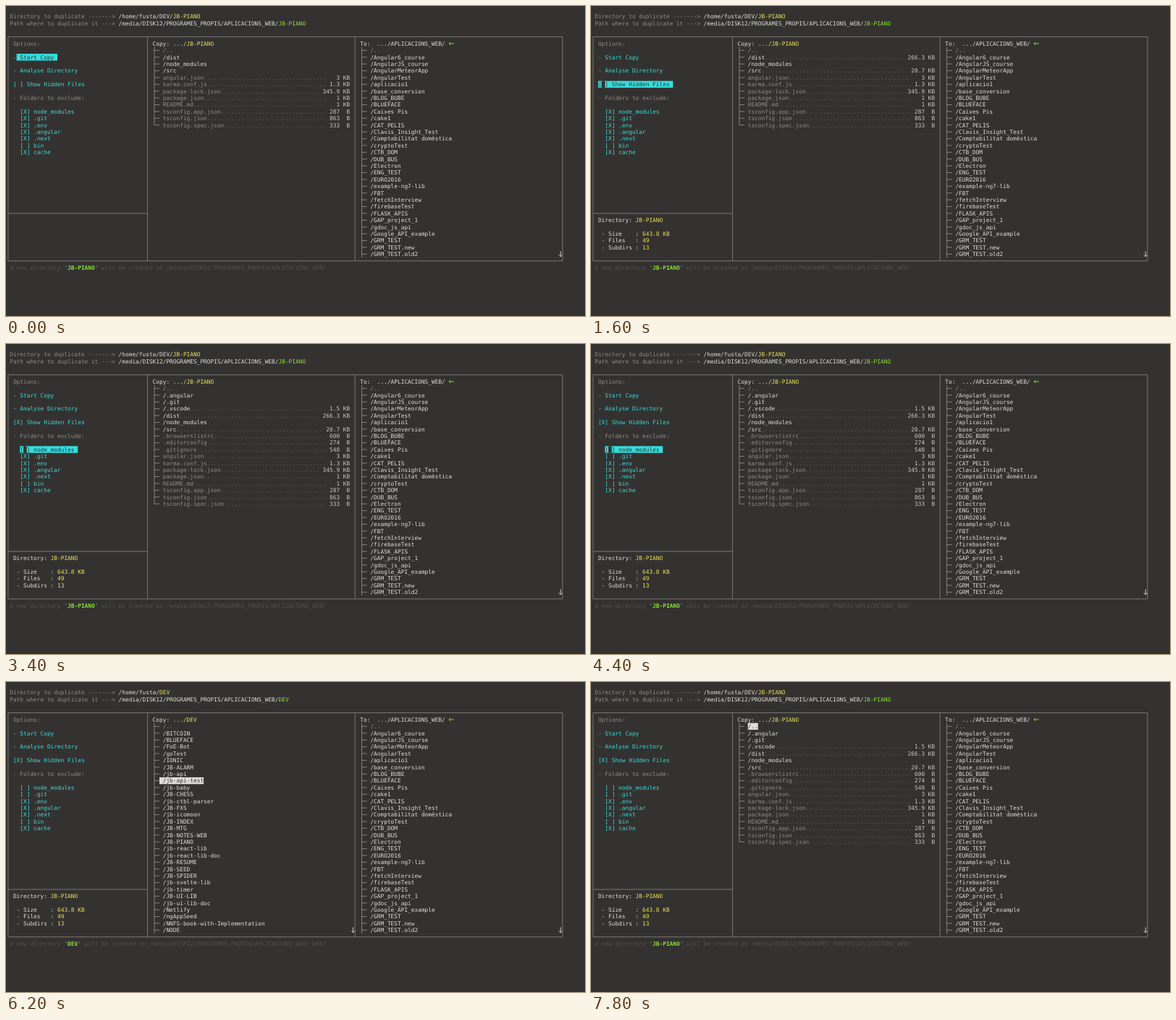
These frames come from a looping animation (800 px wide and 429 px high, 8 s). An HTML page with a canvas:

```html
<!DOCTYPE html>
<html lang="en">
<head>
<meta charset="utf-8">
<title>Directory copy tool</title>
<style>
  html, body { margin: 0; width: 100%; height: 100%; overflow: hidden; background: #343230; }
  canvas { display: block; }
</style>
</head>
<body>
<canvas id="stage" width="800" height="429"></canvas>
<script>
const ctx = document.getElementById('stage').getContext('2d');
const LOOP = 8000, STEP = 200;
const CELL_W = 4.7, CELL_H = 9.4;
const BG = '#343230', WHITE = '#e0deda', GRAY = '#8e8c88', FAINT = '#53514e', LINE = '#817f7b',
      CYAN = '#34dede', YELLOW = '#ece35a', LIME = '#8ae234', OLIVE = '#8b8a55';
const FONT = '7.8px "DejaVu Sans Mono", "Noto Sans Mono", monospace';

const TARGET = '/media/DISK12/PROGRAMES_PROPIS/APLICACIONS_WEB/';
const EXCLUDES = ['node_modules', '.git', '.env', '.angular', '.next', 'bin', 'cache'];
const TARGET_DIRS = `Angular6_course,AngularJS_course,AngularMeteorApp,AngularTest,aplicacio1,base_conversion,BLOG_BUBE,BLUEFACE,Caixes Pis,cake1,CAT_PELIS,Clavis_Insight_Test,Comptabilitat domèstica,cryptoTest,CTB_DOM,DUB_BUS,Electron,ENG_TEST,EURO2016,example-ng7-lib,FBT,fetchInterview,firebaseTest,FLASK_APIS,GAP_project_1,gdoc_js_api,Google_API_example,GRM_TEST,GRM_TEST.new,GRM_TEST.old2`.split(',');
const DEV_DIRS = `BITCOIN,BLUEFACE,FoE-Bot,goTest,IONIC,JB-ALARM,jb-api,jb-api-test,jb-baby,JB-CHESS,jb-ctbl-parser,JB-FXS,jb-icomoon,JB-INDEX,JB-MTG,JB-NOTES-WEB,JB-PIANO,jb-react-lib,jb-react-lib-doc,JB-RESUME,JB-SEED,JB-SPIDER,jb-svelte-lib,jb-timer,JB-UI-LIB,jb-ui-lib-doc,Netlify,ngAppSeed,NNFS-book-with-Implementation,NODE`.split(',');
const PROJECT = [
  ['/.angular'], ['/.git'], ['/.vscode', '1.5 KB'], ['/dist', '266.3 KB'], ['/node_modules'],
  ['/src', '20.7 KB'], ['.browserslistrc', '600  B'], ['.editorconfig', '274  B'],
  ['.gitignore', '548  B'], ['angular.json', '3 KB'], ['karma.conf.js', '1.3 KB'],
  ['package-lock.json', '345.9 KB'], ['package.json', '1 KB'], ['README.md', '1 KB'],
  ['tsconfig.app.json', '287  B'], ['tsconfig.json', '863  B'], ['tsconfig.spec.json', '333  B']
];
const asFolders = names => names.map(name => ['/' + name]);

const colX = col => 0.5 + col * CELL_W;
const rowY = row => 5 + row * CELL_H;
const midX = col => colX(col + 0.5);

function text(col, row, string, color) {
  ctx.fillStyle = color;
  [...string].forEach((char, i) => {
    if (char !== ' ') ctx.fillText(char, midX(col + i), rowY(row) + 2.8);
  });
}

function fillCells(col, row, count, color) {
  ctx.fillStyle = color;
  ctx.fillRect(colX(col), rowY(row) - CELL_H / 2, count * CELL_W, CELL_H);
}

function line(color, ...points) {
  ctx.strokeStyle = color;
  ctx.beginPath();
  points.forEach(([x, y]) => ctx.lineTo(x, y));
  ctx.stroke();
}

function downArrow(col) {
  const x = midX(col) + 2, y = rowY(36);
  line(WHITE, [x, y - 4], [x, y + 3.5]);
  line(WHITE, [x - 2.3, y + 1], [x, y + 3.5], [x + 2.3, y + 1]);
}

function frame() {
  const left = midX(0), right = midX(163), top = rowY(4), bottom = rowY(37);
  line(LINE, [left, top], [right, top], [right, bottom], [left, bottom], [left, top]);
  for (const col of [41, 102]) line(LINE, [midX(col), top], [midX(col), bottom]);
  line(LINE, [left, rowY(30)], [midX(41), rowY(30)]);
}

function tree(col, items, { showFolderSizes, pick = -1, pickOffset = 2, scrolls }) {
  [['/..'], ...items].forEach(([name, size], i, all) => {
    const row = 6 + i, y = rowY(row), x = midX(col);
    const isFolder = name[0] === '/', isLast = i === all.length - 1 && !scrolls;
    line(GRAY, [x, y - CELL_H / 2], [x, isLast ? y : y + CELL_H / 2]);
    line(GRAY, [x, y], [colX(col + 2), y]);

    if (i === pick) fillCells(col + pickOffset, row, name.length + 3 - pickOffset, WHITE);
    text(col + 3, row, name, i === pick ? BG : isFolder && i ? WHITE : GRAY);

    if (size && (!isFolder || showFolderSizes)) {
      const start = col + 3 + name.length, sizeCol = 101 - size.length;
      text(start, row, '.'.repeat(Math.min(94, sizeCol - 1) - start), '#65635f');
      text(sizeCol, row, size, '#cbc9c5');
    }
  });
}

function action(row, label, selected) {
  text(2, row, '-', CYAN);
  if (selected) fillCells(3, row, label.length + 2, CYAN);
  text(4, row, label, selected ? BG : CYAN);
}

function checkbox(col, row, label, checked, selected) {
  const color = selected ? BG : CYAN;
  if (selected) {
    fillCells(col, row, label.length + 5, CYAN);
    fillCells(col + 1, row, 1, BG);
  }
  text(col, row, '[ ] ' + label, color);
  if (checked) text(col + 1, row, 'X', CYAN);
}

// Value of the last [start, value] pair already reached
const latest = (t, pairs) => pairs.filter(([start]) => t >= start).pop()[1];

function stateAt(t) {
  const presses = Math.floor((t - 5400) / STEP);
  const picked = presses > 0 ? Math.min(17, 1 + Math.floor((presses - 1) * 2.6)) : 0;
  return {
    cursor: latest(t, [[0, 7], [600, 9], [1400, 11], [2600, 15], [3800, 16], [4200, 15], [4800, -1]]),
    analysed: t >= 1000,
    hidden: t >= 1800,
    unchecked: { node_modules: t >= 3000, '.git': t >= 4000, bin: true },
    inDev: t >= 5200 && t < 7400,
    pick: t < 4800 ? -1 : t < 7400 ? picked : 0,
    pickOffset: t < 7400 ? 2 : 3
  };
}

function drawOptions(s) {
  text(2, 5, 'Options:', GRAY);
  action(7, 'Start Copy', s.cursor === 7);
  action(9, 'Analyse Directory', s.cursor === 9);
  checkbox(2, 11, 'Show Hidden Files', s.hidden, s.cursor === 11);
  text(2, 13, '- Folders to exclude:', GRAY);
  EXCLUDES.forEach((name, i) => checkbox(4, 15 + i, name, !s.unchecked[name], s.cursor === 15 + i));

  if (!s.analysed) return;
  text(2, 31, 'Directory:', WHITE);
  text(13, 31, 'JB-PIANO', YELLOW);
  [['Size', '643.8 KB'], ['Files', '49'], ['Subdirs', '13']].forEach(([label, value], i) => {
    text(3, 33 + i, '- ' + label.padEnd(8) + ':', WHITE);
    text(15, 33 + i, value, YELLOW);
  });
}

function drawFooter(name, inDev) {
  const end = 18 + name.length;
  ctx.font = 'italic ' + FONT;
  text(1, 38, 'A new directory', FAINT);
  text(end + 2, 38, 'will be created on ' + TARGET + (inDev ? '_WEB/' : ''), FAINT);
  ctx.font = 'bold ' + FONT;
  text(17, 38, "'", OLIVE);
  text(18, 38, name, LIME);
  text(end, 38, "'", OLIVE);
  ctx.font = FONT;
}

function draw(t) {
  const s = stateAt(t), name = s.inDev ? 'DEV' : 'JB-PIANO';
  ctx.fillStyle = BG;
  ctx.fillRect(0, 0, 800, 429);
  ctx.font = FONT;
  ctx.textAlign = 'center';
  ctx.textRendering = 'geometricPrecision';
  ctx.lineWidth = 0.9;

  const home = s.inDev ? '/home/fusta/' : '/home/fusta/DEV/';
  text(1, 1, 'Directory to duplicate ------->', GRAY);
  text(33, 1, home, WHITE);
  text(33 + home.length, 1, name, YELLOW);
  text(1, 2, 'Path where to duplicate it --->', GRAY);
  text(33, 2, TARGET, WHITE);
  text(33 + TARGET.length, 2, name, LIME);

  frame();
  drawOptions(s);

  text(43, 5, 'Copy:', WHITE);
  text(49, 5, '.../' + name, YELLOW);
  const project = PROJECT.filter(([file]) => s.hidden || !/^\/?\./.test(file));
  tree(43, s.inDev ? asFolders(DEV_DIRS) : project, {
    showFolderSizes: s.analysed, pick: s.pick, pickOffset: s.pickOffset, scrolls: s.inDev
  });
  if (s.inDev) downArrow(101);

  text(104, 5, 'To:  .../APLICACIONS_WEB/', WHITE);
  const arrowX = 612, arrowY = rowY(5);
  line(LIME, [arrowX, arrowY], [arrowX + 7, arrowY]);
  line(LIME, [arrowX + 2.3, arrowY - 2], [arrowX, arrowY], [arrowX + 2.3, arrowY + 2]);
  tree(104, asFolders(TARGET_DIRS), { scrolls: true });
  downArrow(162);

  drawFooter(name, s.inDev);
}

function tick() {
  draw(performance.now() % LOOP);
  requestAnimationFrame(tick);
}
tick();
</script>
</body>
</html>
```
